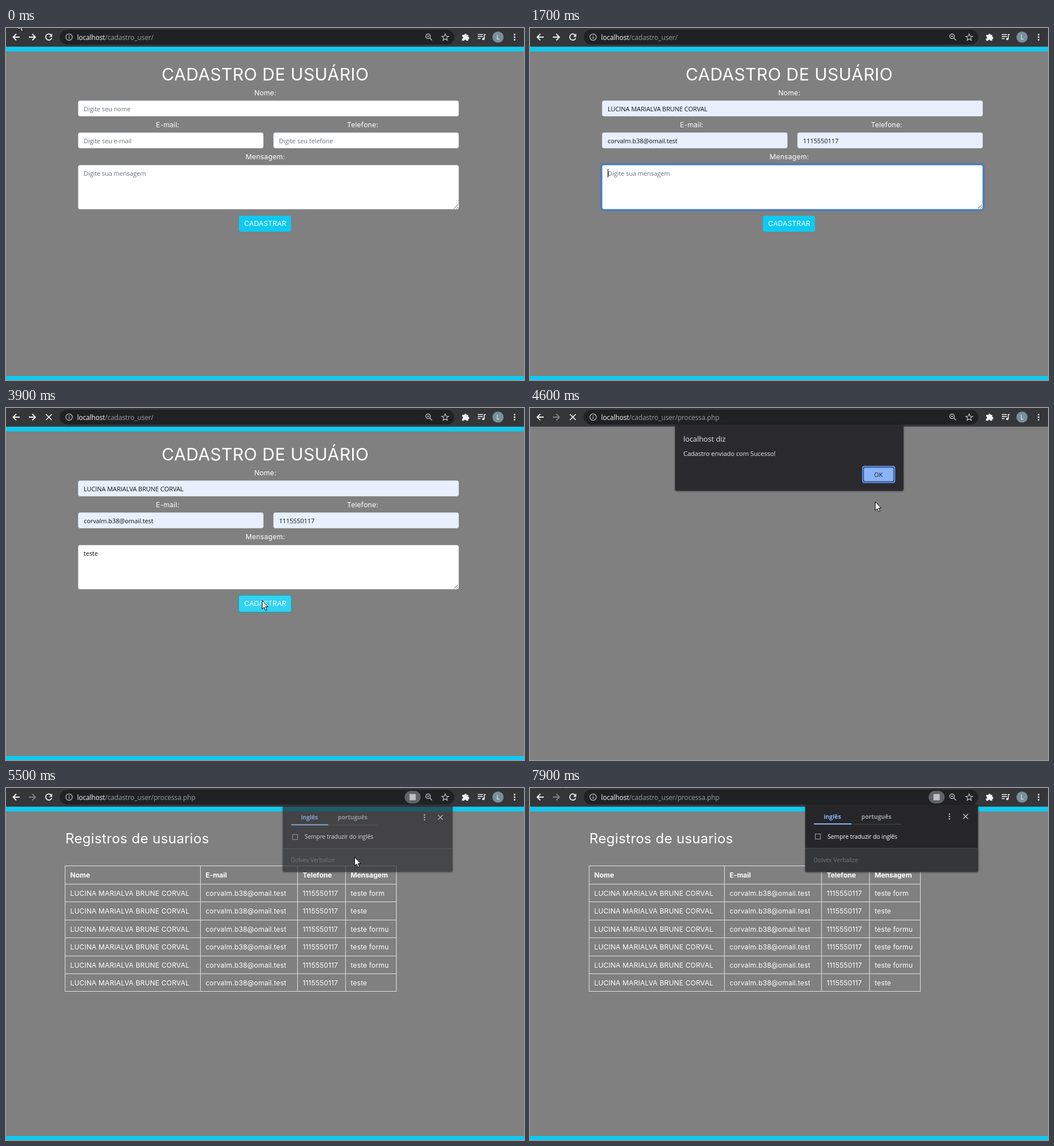
Write an HTML page that moves like this. It is 907x617 px and loops after 8 s.

```html
<!DOCTYPE html>
<html lang="pt-BR">
<head>
<meta charset="utf-8">
<title>Cadastro de usuário</title>
<style>
  html, body { margin: 0; width: 100%; height: 100%; overflow: hidden; background: #808080; }
  svg { display: block; width: 100vw; height: 100vh; }
  text { white-space: pre; }
  .ui { font-family: "Open Sans", "Noto Sans", sans-serif; }
  .page { font-family: Inter, "Open Sans", sans-serif; font-weight: 400; letter-spacing: .014em; fill: #fff; }
  .head { font-weight: 700; letter-spacing: 0; }
</style>
</head>
<body>
<svg id="stage" viewBox="0 0 907 617" xmlns="http://www.w3.org/2000/svg"></svg>
<script>
const LOOP = 8000;
const CYAN = '#0dcaf0';
const person = { name: 'LUCINA MARIALVA BRUNE CORVAL', mail: 'corvalm.b38@omail.test', phone: '1115550117' };

const rect = (x, y, w, h, fill, extra = '') =>
  `<rect x="${x}" y="${y}" width="${w}" height="${h}" fill="${fill}" ${extra}/>`;
const line = (d, color, w = 1) =>
  `<path d="${d}" fill="none" stroke="${color}" stroke-width="${w}"/>`;
const ui = (x, y, size, fill, str, extra = '') =>
  `<text class="ui" x="${x}" y="${y}" font-size="${size}" fill="${fill}" ${extra}>${str}</text>`;
const page = (x, y, size, str, extra = '', kind = '') =>
  `<text class="page ${kind}" x="${x}" y="${y}" font-size="${size}" ${extra}>${str}</text>`;
const group = (id, body) => `<g id="${id}">${body}</g>`;
const middle = 'text-anchor="middle"';
const bold = 'font-weight="700"';
const dots = (x, y, gap, r, fill) =>
  [-gap, 0, gap].map(d => `<circle cx="${x}" cy="${y + d}" r="${r}" fill="${fill}"/>`).join('');

function toolbar() {
  const white = '#f1f3f4', soft = '#bdc1c6';
  const star = Array.from({ length: 10 }, (_, i) => {
    const r = i % 2 ? 2.7 : 6.3, a = i * Math.PI / 5;
    return `${(769 + r * Math.sin(a)).toFixed(1)} ${(16.5 - r * Math.cos(a)).toFixed(1)}`;
  }).join('L');
  return rect(0, 0, 907, 32, '#35363a') + rect(0, 32, 907, 1, '#505154') +
    rect(94, 3, 691, 26, '#202124', 'rx="13"') +
    line('M24 16H12.5M18 10.5L12.5 16L18 21.5', white, 1.8) +
    group('forward', line('M40 16H51.5M46 10.5L51.5 16L46 21.5', white, 1.8)) +
    group('reload', line('M79 12.2A5.4 5.4 0 1 0 80.1 17.5', white, 1.8) +
      `<path d="M81 10v5.5h-5.5z" fill="${white}"/>`) +
    group('stop', line('M70 11L80 21M80 11L70 21', white, 1.7)) +
    `<circle cx="110.5" cy="16" r="5.6" fill="none" stroke="${soft}" stroke-width="1.2"/>` +
    line('M110.5 15V19M110.5 12.7V14', soft, 1.3) +
    ui(124.5, 20.5, 11.7, '#9aa0a6', '<tspan fill="#fff" font-weight="500">localhost</tspan><tspan id="path"></tspan>') +
    group('translate', rect(698, 5, 28, 22, '#5f6368', 'rx="11"') + rect(706.5, 10.5, 11, 11, soft, 'rx="1"')) +
    `<circle cx="739" cy="14.5" r="4" fill="none" stroke="${soft}" stroke-width="1.4"/>` +
    line('M742 17.5L746 21.5M737 14.5H741', soft, 1.5) +
    `<path d="M${star}Z" fill="none" stroke="${soft}" stroke-width="1.2"/>` +
    `<path d="M799 12h3.5a2 2 0 1 1 4 0h2.8v3.5a2 2 0 1 1 0 4v2.8h-3.5a1.8 1.8 0 0 0-3.6 0h-3.7v-3.6a1.9 1.9 0 0 0 0-3.8z" fill="${white}"/>` +
    line('M826 11.5H835M826 15H835M826 18.5H831M837.5 19V11.5H840', white, 1.5) +
    `<circle cx="835.8" cy="19.3" r="2" fill="${white}"/>` +
    '<circle cx="861.5" cy="16" r="9.8" fill="#78909c"/>' +
    ui(861.5, 19.8, 10.5, '#fff', 'L', middle) + dots(890.5, 16, 4.6, 1.5, white);
}

function field(id, x, y, w, h) {
  return rect(x - 1.5, y - 1.5, w + 3, h + 3, 'none', `id="${id}Ring" rx="5" stroke="#0d6efd" stroke-opacity=".4" stroke-width="3"`) +
    rect(x + .5, y + .5, w - 1, h - 1, '#fff', `id="${id}Box" rx="3" stroke="#ced4da"`) +
    ui(x + 10, y + 19, 11, '#6c757d', '', `id="${id}Text" letter-spacing="-.08"`);
}

function form() {
  return page(454, 91.5, 30, 'CADASTRO DE USUÁRIO', middle) +
    page(454, 118, 12.2, 'Nome:', middle) + page(283, 174, 12.2, 'E-mail:', middle) +
    page(624.5, 174, 12.2, 'Telefone:', middle) + page(454, 230, 12.2, 'Mensagem:', middle) +
    field('name', 126, 127, 667, 28) + field('mail', 126, 183, 325, 28) +
    field('phone', 468, 183, 325, 28) + field('msg', 126, 240, 667, 78) +
    line('M784.5 316.5L791 310M788.5 316.5L791 314', '#555') +
    rect(407, 328, 93, 30, 'none', 'id="btnRing" rx="4" stroke="#0bacbe" stroke-opacity=".6" stroke-width="2"') +
    rect(408, 329, 91, 28, CYAN, 'id="btn" rx="3"') +
    page(454, 347.4, 12, 'CADASTRAR', middle) +
    rect(0, 0, 1, 15, '#000', 'id="caret"');
}

function dropdown() {
  return rect(127, 157, 224, 102, '#292a2d', 'rx="3" filter="url(#shade)"') +
    rect(127, 161, 224, 54, '#45464a') + rect(127, 220, 224, 1, '#3c4043') +
    ui(137.5, 184, 11, '#e8eaed', person.name, 'font-weight="600"') +
    ui(137.5, 203, 10.4, '#e8eaed', person.mail) + ui(137.5, 245, 10.5, '#e8eaed', 'Gerenciar...');
}

function alertBox() {
  return rect(254, 29, 400, 116, '#292a2d', 'rx="3" filter="url(#shade)"') +
    ui(268.5, 59, 12.8, '#e8eaed', 'localhost diz') +
    ui(268.5, 83.5, 11.2, '#e8eaed', 'Cadastro enviado com Sucesso!', 'letter-spacing="-.1"') +
    rect(582.5, 102.5, 56, 28, '#202124', 'rx="3" stroke="#5b9bff" stroke-width="2"') +
    rect(584.5, 104.5, 52, 24, '#8ab4f8', 'rx="2"') +
    ui(610, 120.5, 10.8, '#202124', 'OK', middle);
}

function records() {
  const cols = [103.5, 340.5, 510.5, 594.5, 683.5];
  const rowY = i => Math.ceil(136 + i * 31.42) + .5;
  const rows = ['teste form', 'teste', 'teste formu', 'teste formu', 'teste formu', 'teste']
    .map(msg => [person.name, person.mail, person.phone, msg]);
  rows.unshift(['Nome', 'E-mail', 'Telefone', 'Mensagem']);
  const cells = rows.map((row, r) => row.map((str, c) =>
    page(cols[c] + 9, rowY(r) + 20, 12, str, '', r ? '' : 'head')).join('')).join('');
  const grid = cols.map(x => `M${x} 136V357`).join('') +
    Array.from({ length: 8 }, (_, i) => `M103 ${rowY(i)}H684`).join('');
  return page(104, 97.3, 24, 'Registros de usuarios') + line(grid, '#dee2e6') + cells;
}

function popup() {
  return rect(482, 29, 302.5, 118, '#27282b', 'rx="3" filter="url(#shade)"') +
    rect(482, 105, 302.5, 42, '#35363a', 'id="footer"') + rect(482, 105, 302.5, 1, '#45464a') +
    ui(529.5, 53.5, 10.3, '#8ab4f8', 'inglês', `${middle} ${bold}`) +
    ui(606.5, 53.5, 10.3, '#9aa0a6', 'português', `${middle} ${bold}`) +
    rect(497, 63, 153, 1, '#45484c') + rect(497, 62, 66, 2, '#8ab4f8') +
    dots(734.5, 50, 4.3, 1.3, '#bdc1c6') +
    line('M758.5 45.5L767 54M767 45.5L758.5 54', '#bdc1c6', 1.4) +
    rect(499.5, 80.5, 9, 9, 'none', 'stroke="#9aa0a6"') +
    ui(521, 88.5, 10.4, '#fff', 'Sempre traduzir do inglês', 'letter-spacing="-.08"') +
    ui(496.5, 130, 10.2, '#6f7377', 'Dolvex Verbalize');
}

document.getElementById('stage').innerHTML =
  '<defs><filter id="shade" x="-10%" y="-10%" width="120%" height="130%"><feDropShadow dx="0" dy="1" stdDeviation="1.5" flood-opacity=".5"/></filter></defs>' +
  rect(0, 0, 907, 617, '#808080') +
  group('bars', rect(0, 33, 907, 8, CYAN) + rect(0, 610, 907, 7, CYAN)) +
  group('form', form()) + group('records', records()) + toolbar() +
  group('dropdown', dropdown()) + group('alert', alertBox()) + group('popup', popup()) +
  group('cursor', '<path d="M.5 .5V15.5L4 12.3L6.3 17.8L8.7 16.8L6.4 11.5H11Z" fill="#fff" stroke="#000" stroke-linejoin="round"/>');

const el = id => document.getElementById(id);
const show = (id, on) => el(id).setAttribute('display', on ? 'inline' : 'none');
const within = (t, a, b) => t >= a && t < b;

// Pointer stops: time, x, y
const stops = [
  [0, 21, -12], [200, 80, 25], [500, 210, 138], [700, 216, 160], [900, 217, 172], [1200, 217, 172],
  [1400, 300, 250], [3100, 358, 398], [3300, 358, 398], [3500, 405, 372], [3700, 448, 337],
  [4300, 448, 337], [4400, 500, 285], [4500, 570, 200], [4600, 604, 164], [4700, 604, 164],
  [4800, 610, 121], [5800, 610, 121], [6000, 560, 215], [6200, 420, 300], [6400, 220, 270],
  [6600, 80, 110], [6700, 56, 48], [6800, 50, 23], [6900, 50, 23], [7100, 48, 2], [7400, 60, -12],
  [7500, 60, -12], [7600, 76, -10], [7900, 50, -17], [8000, 50, -17]
];

function pointerAt(t) {
  const i = Math.max(1, stops.findIndex(s => s[0] >= t));
  const [t0, x0, y0] = stops[i - 1], [t1, x1, y1] = stops[i];
  const k = (t - t0) / (t1 - t0);
  return [Math.round(x0 + (x1 - x0) * k), Math.round(y0 + (y1 - y0) * k)];
}

function setField(id, value, hint, auto, focus) {
  const text = el(id + 'Text');
  text.textContent = value || hint;
  text.setAttribute('fill', value ? '#111' : '#6c757d');
  el(id + 'Box').setAttribute('fill', value && auto ? '#e8f0fe' : '#fff');
  el(id + 'Box').setAttribute('stroke', focus ? '#86b7fe' : '#ced4da');
  show(id + 'Ring', focus);
}

function drawForm(t) {
  const filled = t >= 900;
  const onName = within(t, 500, 1600), onMsg = within(t, 1600, 3800);
  const typed = 'teste'.slice(0, t < 2400 ? 0 : t < 2600 ? 2 : t < 2700 ? 3 : t < 2900 ? 4 : 5);
  setField('name', filled && person.name, 'Digite seu nome', true, onName);
  setField('mail', filled && person.mail, 'Digite seu e-mail', true, false);
  setField('phone', filled && person.phone, 'Digite seu telefone', true, false);
  setField('msg', typed, 'Digite sua mensagem', false, onMsg);

  const caret = el('caret');
  const active = onName ? 'name' : 'msg';
  const empty = onName ? !filled : !typed;
  const x = 136 + (empty ? 0 : el(active + 'Text').getComputedTextLength());
  caret.setAttribute('x', Math.round(x));
  caret.setAttribute('y', onName ? 134 : 247);
  show('caret', (onName || onMsg) && !within(t, 2100, 2400) && !within(t, 3400, 3800));

  el('btn').setAttribute('fill', t >= 3700 ? '#31d2f2' : CYAN);
  show('btnRing', t >= 3800);
}

function draw(time) {
  const t = Math.floor(time / 100) * 100;
  const onForm = t < 4000, onTable = t >= 5000;
  show('form', onForm);
  show('records', onTable);
  show('bars', onForm || onTable);
  if (onForm) drawForm(t);

  const loading = within(t, 3800, 5000);
  show('stop', loading);
  show('reload', !loading);
  show('translate', t >= 5300);
  el('forward').setAttribute('opacity', onForm ? 1 : .4);
  el('path').textContent = '/cadastro_user/' + (onForm ? '' : 'processa.php');

  show('dropdown', within(t, 600, 1300));
  el('dropdown').setAttribute('opacity', t < 1100 ? 1 : .78);
  show('alert', within(t, 4100, 4900));

  const open = Math.min(1, Math.max(0, (t - 5300) / 300));
  show('popup', open > 0);
  el('popup').setAttribute('opacity', open);
  el('footer').setAttribute('opacity', open ** 3);
  const scale = 1 - (1 - open) * .05;
  el('popup').setAttribute('transform', `translate(633.5 147) scale(${scale}) translate(-633.5 -147)`);

  show('cursor', !within(t, 500, 700) && !within(t, 1400, 3200));
  el('cursor').setAttribute('transform', `translate(${pointerAt(t).join(' ')})`);
}

const start = performance.now();
function tick() {
  draw((performance.now() - start) % LOOP);
  requestAnimationFrame(tick);
}
tick();
</script>
</body>
</html>
```
